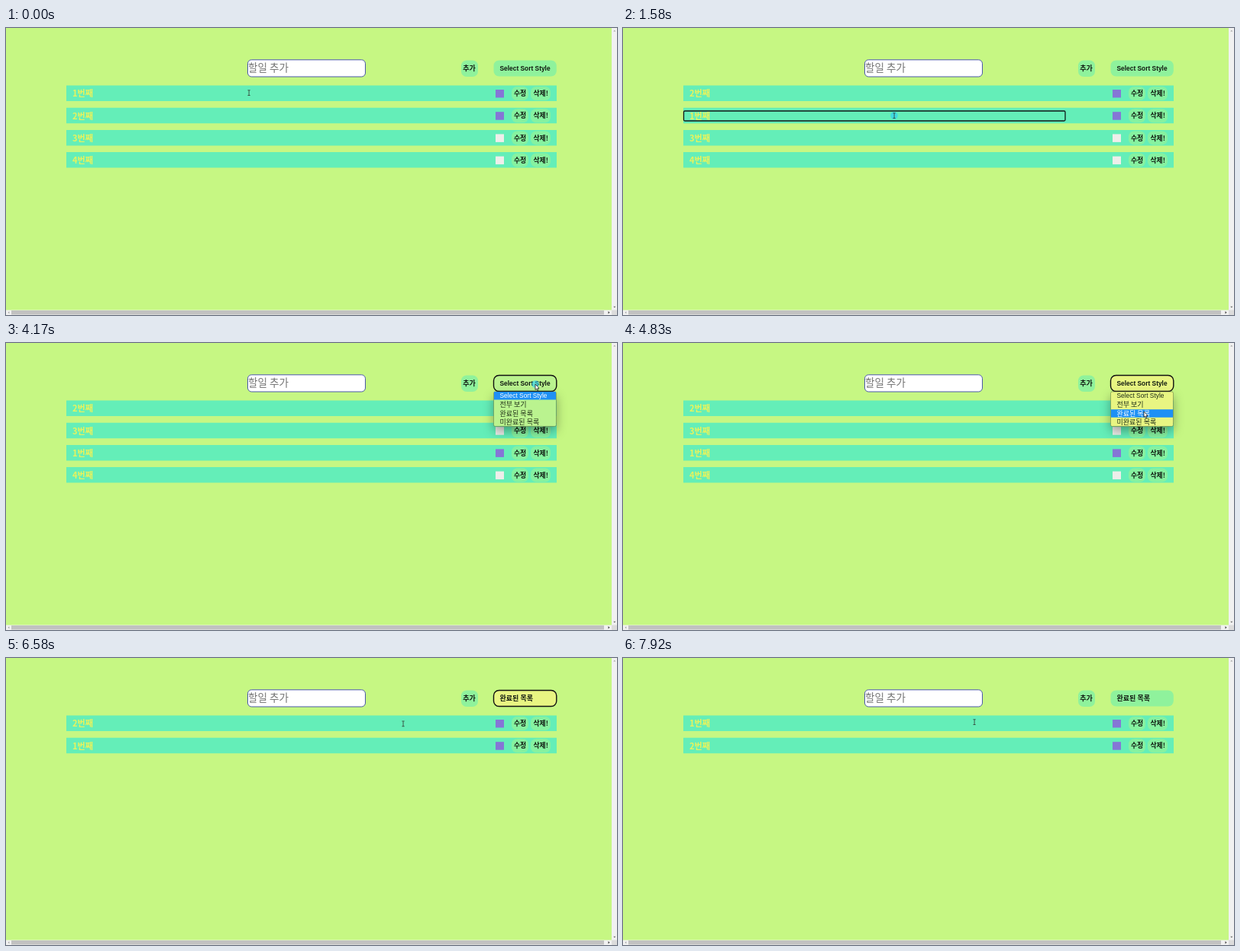
Animation, 800 px wide and 377 px high, one loop 8 s. Source, as an HTML page with a canvas:

```html
<!DOCTYPE html>
<html lang="ko">
<head>
<meta charset="utf-8">
<title>할일 목록</title>
<style>
  html, body { margin: 0; width: 100%; height: 100%; overflow: hidden; background: #c6f783; }
  canvas { display: block; width: 100%; height: 100%; }
</style>
</head>
<body>
<canvas id="stage" width="800" height="377"></canvas>
<script>
const ctx = document.getElementById('stage').getContext('2d');
const LOOP = 8000, STEP = 1000 / 12;
const FONT = '"Liberation Sans", "Noto Sans CJK KR", "Noto Sans CJK", sans-serif';
const KOREAN = '"Noto Sans CJK KR", "Noto Sans CJK", sans-serif';
const GREEN = [143, 242, 156], YELLOW = [232, 245, 130];
const OPTIONS = ['Select Sort Style', '전부 보기', '완료된 목록', '미완료된 목록'];
const OPEN = 4100, CLOSE = 5900, BLUR = 6870;

// Order of the list from each moment on
const ORDERS = [[0, '1234'], [740, '2134'], [1980, '2314'], [6240, '21'], [7560, '12']];

const DRAGS = [
  { row: 0, press: 240, start: 400, drop: 740 },
  { row: 1, press: 1540, start: 1620, drop: 1980 },
  { row: 0, press: BLUR, start: 6990, drop: 7560 },
];
const CLICKS = [[4070, 4250], [5890, 6120]];

// Pointer path: time, x, y
const PATH = [
  [80, 318, 85], [240, 328, 85], [400, 331, 86], [700, 341, 115], [830, 345, 115],
  [1450, 355, 115], [1600, 355, 115], [1750, 352, 137], [1950, 374, 148],
  [2330, 406, 191], [3080, 406, 191], [3830, 670, 94], [4080, 693, 54],
  [4300, 693, 54], [4660, 687, 80], [4830, 682, 90], [5000, 682, 90],
  [5080, 685.5, 89], [6200, 685.5, 89], [6800, 450, 85], [6990, 450, 85],
  [7250, 455, 98.5], [7340, 458, 115], [7560, 458, 113], [7830, 460, 84],
];

const clamp = v => Math.max(0, Math.min(1, v));
const within = (t, a, b) => t >= a && t < b;
const rowTop = i => 75.5 + i * 29.2;

function pointerAt(t) {
  const next = PATH.findIndex(p => p[0] > t);
  if (next === 0) return PATH[0].slice(1);
  if (next < 0) return PATH[PATH.length - 1].slice(1);
  const [t0, x0, y0] = PATH[next - 1], [t1, x1, y1] = PATH[next];
  const u = (t - t0) / (t1 - t0), e = u * u * (3 - 2 * u);
  return [x0 + (x1 - x0) * e, y0 + (y1 - y0) * e];
}

function box(x, y, w, h, r, fill, stroke, line = 1) {
  ctx.beginPath();
  ctx.roundRect(x, y, w, h, r);
  if (fill) { ctx.fillStyle = fill; ctx.fill(); }
  if (stroke) { ctx.strokeStyle = stroke; ctx.lineWidth = line; ctx.stroke(); }
}

function poly(points, fill, stroke) {
  ctx.beginPath();
  points.forEach(([x, y]) => ctx.lineTo(x, y));
  ctx.closePath();
  ctx.fillStyle = fill;
  ctx.fill();
  if (stroke) { ctx.strokeStyle = stroke; ctx.lineWidth = 0.8; ctx.stroke(); }
}

function label(text, x, y, size, color = '#101810', weight = 'bold', family = KOREAN) {
  ctx.font = `${weight} ${size}px ${family}`;
  ctx.fillStyle = color;
  ctx.fillText(text, x, y);
}

function optionLabel(i, y, color, weight) {
  if (i) label(OPTIONS[i], 646.5, y, 9, color, weight);
  else label(OPTIONS[0], 646.5, y, 8.4, color, weight, FONT);
}

function drawRow(name, y) {
  box(79, y, 642, 20.5, 0, '#64eeb8');
  label(name + '번째', 87, y + 14.8, 11.1, '#e9f25c');
  box(641, y + 5.5, 11, 10.5, 0, name < 3 ? '#8576d6' : '#eeeeea');
  box(662, y + 1.5, 22, 18, 7, '#86f2a0');
  box(687, y + 1.5, 26, 18, 7, '#86f2a0');
  label('수정', 665, y + 13.7, 8.8);
  label('삭제!', 690.5, y + 13.7, 8.8);
}

function drawGhost(y, dx, dy) {
  ctx.save();
  ctx.translate(dx, dy);
  ctx.globalAlpha = 0.1;
  box(79, y, 642, 20.5, 0, '#64eeb8');
  ctx.globalAlpha = 0.4;
  box(641.5, y + 6, 10, 9.5, 0, null, '#5a5a90');
  box(644, y + 8.5, 5, 4.5, 0, null, '#5a5a90');
  label('수정', 665, y + 13.7, 8.8);
  label('삭제!', 690.5, y + 13.7, 8.8);
  ctx.globalAlpha = 0.7;
  ctx.setLineDash([1, 1]);
  box(79.5, y + 4.5, 499.5, 12.5, 1, null, '#203020');
  ctx.restore();
}

function drawHeader(t) {
  box(316.5, 41.8, 154, 22.2, 5, '#ffffff', '#4a58a8');
  label('할일 추가', 317, 57, 13.6, '#757575', 'normal');
  box(596, 42.5, 22, 21.5, 7, '#8ff29c');
  label('추가', 598.3, 56.3, 9);

  const mix = clamp((t - 4040) / 260) - clamp((t - BLUR) / 250);
  const color = `rgb(${GREEN.map((g, i) => g + (YELLOW[i] - g) * mix)})`;
  const focused = within(t, OPEN, BLUR);
  box(638.5, 42.5, 82.3, 21, 7, color, focused && '#101010', 1.4);
  optionLabel(t < CLOSE ? 0 : 2, 56, '#101810', 'bold');
  return color;
}

function drawMenu(color, y) {
  const hovered = Math.max(0, Math.min(3, Math.floor((y - 64) / 11.4)));
  ctx.save();
  ctx.shadowColor = 'rgba(0,0,0,.35)';
  ctx.shadowBlur = 14;
  ctx.shadowOffsetY = 6;
  box(638.5, 64, 82, 45.5, 2, color);
  ctx.restore();
  box(638.5, 64, 82, 45.5, 2, null, 'rgba(70,90,50,.6)', 0.7);
  box(639, 64 + hovered * 11.6, 81, 10.5, 0, '#1e90f5');
  OPTIONS.forEach((_, i) =>
    optionLabel(i, 71.9 + i * 11.8, i === hovered ? '#ffffff' : '#203018', 'normal'));
}

function drawScrollbars() {
  box(793, 0, 7, 371, 0, '#f1f1f1');
  box(0, 370.5, 793, 6.5, 0, '#f1f1f1');
  box(793, 370.5, 7, 6.5, 0, '#dcdcdc');
  box(7, 371, 776, 5.5, 0, '#c1c1c1');
  poly([[795.3, 4.5], [798.3, 4.5], [796.8, 2.8]], '#a0a0a0');
  poly([[795.3, 365.8], [798.3, 365.8], [796.8, 367.5]], '#606060');
  poly([[4.3, 372.3], [4.3, 375.3], [2.6, 373.8]], '#a0a0a0');
  poly([[788.5, 372], [788.5, 375.4], [790.5, 373.7]], '#404040');
}

function drawPointer(x, y, kind, pressed) {
  if (pressed) {
    ctx.beginPath();
    ctx.arc(x, y, 4.8, 0, Math.PI * 2);
    ctx.fillStyle = 'rgba(40,205,250,.6)';
    ctx.fill();
  }
  if (kind === 'text') {
    box(x - 0.3, y - 3, 0.8, 6.5, 0, '#303830');
    box(x - 1.5, y - 3.6, 3.2, 0.8, 0, '#303830');
    box(x - 1.5, y + 3.2, 3.2, 0.8, 0, '#303830');
    return;
  }
  const shape = [[0, 0], [0, 7.4], [1.7, 6], [2.8, 8.6], [4, 8], [3, 5.6], [5, 5.4]];
  poly(shape.map(([a, b]) => [x + a, y + b]), '#ffffff', '#202020');
  if (kind === 'move') box(x + 2.5, y + 6.5, 4, 4, 0, '#ffffff', '#404040', 0.8);
}

function draw(t) {
  const [x, y] = pointerAt(t);
  const names = [...ORDERS.filter(o => o[0] <= t).pop()[1]];
  const drag = DRAGS.find(d => within(t, d.press, d.drop));
  const moving = drag && t >= drag.start;
  const menuOpen = within(t, OPEN, CLOSE);

  ctx.fillStyle = '#c6f783';
  ctx.fillRect(0, 0, 800, 377);
  names.forEach((name, i) => drawRow(name, rowTop(i)));
  const selectColor = drawHeader(t);
  if (drag) {
    const top = rowTop(drag.row);
    box(79.5, top + 4.3, 499.5, 13, 1.5, null, '#101818', 1.3);
    if (moving) {
      const [px, py] = pointerAt(drag.press);
      drawGhost(top, x - px, y - py);
    }
  }
  if (menuOpen) drawMenu(selectColor, y);
  drawScrollbars();

  const overText = x > 79 && x < 579 &&
    names.some((_, i) => within(y - rowTop(i), 4, 18));
  const kind = moving ? 'move' : overText ? 'text' : 'arrow';
  drawPointer(x, y, kind, drag || CLICKS.some(c => within(t, ...c)));
}

function tick(now) {
  const t = now % LOOP;
  draw(Math.floor((t + 4) / STEP) * STEP % LOOP);
  requestAnimationFrame(tick);
}
requestAnimationFrame(tick);
</script>
</body>
</html>
```
